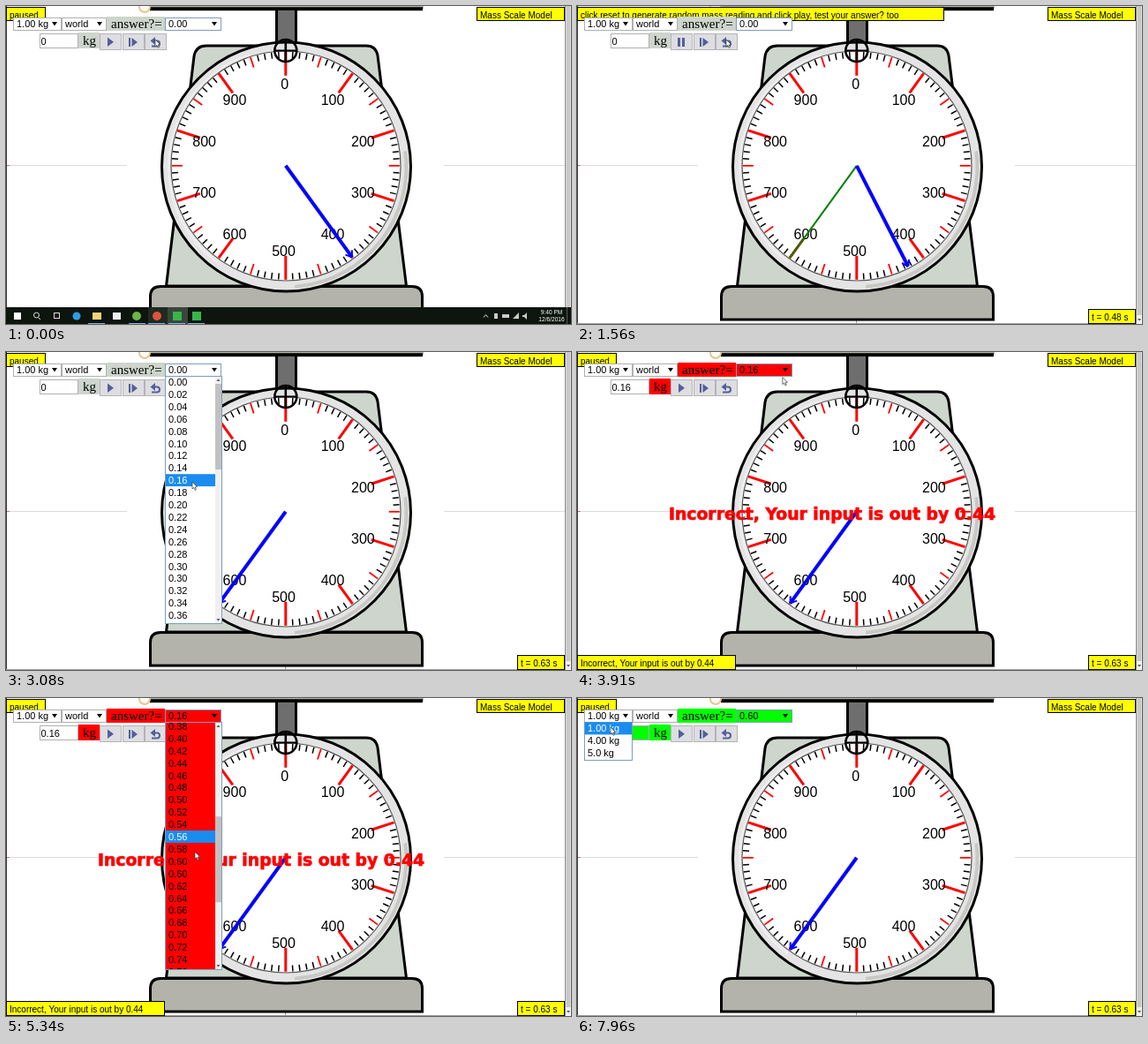
An HTML page with a canvas that plays this animation: 640 by 360 pixels, repeating every 7990 ms.

```html
<!DOCTYPE html>
<html lang="en">
<head>
<meta charset="utf-8">
<title>Mass Scale Model</title>
<style>
html, body { margin: 0; width: 100%; height: 100%; overflow: hidden; background: #fff; }
canvas { display: block; width: 640px; height: 360px; }
</style>
</head>
<body>
<canvas id="stage"></canvas>
<script>
const LOOP = 7990;
const RESET = 260, RUN = 340, STOP = 1950;
const ROW = 13.9, LIST_TOP = 27;
const CX = 316.8, CY = 180.8;
const SANS = '"Liberation Sans", Arial, sans-serif';
const SERIF = '"Liberation Serif", "Times New Roman", serif';
const GREY = '#cdd5cd', RED = '#ff0000', GREEN = '#00ff00', BLUE = '#0000ff';

const canvas = document.getElementById('stage');
const dpr = window.devicePixelRatio || 1;
canvas.width = 640 * dpr;
canvas.height = 360 * dpr;
const g = canvas.getContext('2d');

// pointer path: time, x, y
const path = [
  [0, 169, 38], [1950, 169, 38], [2480, 236, 17], [2600, 236, 17],
  [2900, 213, 118], [3000, 211, 147], [3310, 211, 147], [3970, 235, 17],
  [4420, 235, 17], [4660, 223, 93], [4760, 223, 93], [5190, 220, 143],
  [5220, 220, 143], [5340, 214, 174], [5650, 210, 213], [5950, 207, 197],
  [6550, 207, 197], [7070, 120, 49], [7340, 52, 19], [7400, 50, 20],
  [7530, 42, 32], [7690, 42, 33], [7960, 38, 33], [LOOP, 38, 33]
];

const clamp = v => Math.max(0, Math.min(1, v));
const ease = v => v * v * (3 - 2 * v);
const between = (t, a, b) => t >= a && t < b;

function pointer(t) {
  let i = 1;
  while (i < path.length - 1 && path[i][0] < t) i++;
  const a = path[i - 1], b = path[i];
  const k = clamp((t - a[0]) / (b[0] - a[0]));
  return [a[1] + (b[1] - a[1]) * k, a[2] + (b[2] - a[2]) * k];
}

function rect(x, y, w, h, fill, edge) {
  g.fillStyle = fill;
  g.fillRect(x, y, w, h);
  if (edge) {
    g.strokeStyle = edge;
    g.lineWidth = 1;
    g.strokeRect(x + 0.5, y + 0.5, w - 1, h - 1);
  }
}

function text(s, x, y, font, color = '#000', align = 'left') {
  g.font = font;
  g.fillStyle = color;
  g.textAlign = align;
  g.fillText(s, x, y);
}

function line(x1, y1, x2, y2, color, width) {
  g.strokeStyle = color;
  g.lineWidth = width;
  g.beginPath();
  g.moveTo(x1, y1);
  g.lineTo(x2, y2);
  g.stroke();
}

function disc(x, y, r, fill, edge, width) {
  g.beginPath();
  g.arc(x, y, r, 0, 7);
  if (fill) { g.fillStyle = fill; g.fill(); }
  if (edge) { g.strokeStyle = edge; g.lineWidth = width; g.stroke(); }
}

function arc(r, from, to, color, width) {
  g.beginPath();
  g.arc(317.5, 182, r, from, to);
  g.strokeStyle = color;
  g.lineWidth = width;
  g.stroke();
}

function poly(points, fill) {
  g.beginPath();
  points.forEach(([x, y]) => g.lineTo(x, y));
  g.closePath();
  g.fillStyle = fill;
  g.fill();
}

function outline(fill) {
  g.fillStyle = fill;
  g.fill();
  g.strokeStyle = '#000';
  g.lineWidth = 3;
  g.stroke();
}

const polar = (value, r, x = CX, y = CY) => {
  const a = value / 1000 * 2 * Math.PI;
  return [x + r * Math.sin(a), y - r * Math.cos(a)];
};

function drawScale() {
  line(0, 180.5, 137, 180.5, '#dcdcdc', 1);
  line(496, 180.5, 633, 180.5, '#dcdcdc', 1);
  line(0, 180.5, 4, 180.5, '#b08080', 1);
  line(316.5, 356, 316.5, 360, '#999', 1);

  // housing
  g.beginPath();
  g.moveTo(181.5, 317);
  g.lineTo(213, 57);
  g.quadraticCurveTo(215, 45, 227, 45);
  g.lineTo(408, 45);
  g.quadraticCurveTo(419, 45, 421, 56);
  g.lineTo(453.5, 317);
  g.closePath();
  outline(GREY);

  // top plate and column
  rect(163, 0, 310, 3, '#b3b3ab');
  line(163, 3.3, 472, 3.3, '#000', 4);
  rect(306, 5, 23, 43, '#6e6e6e');
  line(306.5, 4, 306.5, 48, '#000', 3);
  line(328.5, 4, 328.5, 48, '#000', 3);

  // base
  g.beginPath();
  g.moveTo(163.5, 355);
  g.lineTo(163.5, 329);
  g.quadraticCurveTo(163.5, 317.5, 175, 317.5);
  g.lineTo(460, 317.5);
  g.quadraticCurveTo(471.5, 317.5, 471.5, 329);
  g.lineTo(471.5, 355);
  g.closePath();
  outline('#b3b3ab');

  // rim and face
  disc(317.5, 182, 141, '#e4e4e4', '#000', 3);
  arc(136, -0.13, 1.5, '#c8c8c4', 4);
  arc(133, 2.2, 4.4, '#eee', 3);
  disc(317, 181, 130, '#fff', '#555', 1.2);

  for (let v = 0; v < 1000; v += 10) {
    const major = v % 100 === 0, half = v % 50 === 0;
    const inner = major ? 102 : half ? 117 : 122;
    line(...polar(v, inner), ...polar(v, 129),
      half ? RED : '#000', major ? 3 : half ? 1.8 : 1.5);
  }
  for (let v = 0; v < 1000; v += 100) {
    const [x, y] = polar(v, 94.5, 314.5, 182.5);
    text(v, v ? x : x + 1.3, y + 5.5, '16px ' + SANS, '#000', 'center');
  }

  disc(316.8, 50.5, 12.5, null, '#000', 2.6);
  line(304, 50.5, 330, 50.5, '#000', 2);
  line(316.8, 38, 316.8, 63, '#000', 2.6);
}

function drawNeedle(value) {
  const [x, y] = polar(value, 128);
  line(CX, CY, x, y, BLUE, 4);
  const a = Math.atan2(y - CY, x - CX);
  for (const side of [-0.6, 0.6]) {
    line(x, y, x - 8 * Math.cos(a + side), y - 8 * Math.sin(a + side), BLUE, 2);
  }
}

function banner(s, color) {
  text(s, 289, 190, 'bold 18.8px "DejaVu Sans", Verdana, sans-serif', color, 'center');
  g.strokeStyle = color;
  g.lineWidth = 0.7;
  g.strokeText(s, 289, 190);
}

function label(s, x, y, w, h = 17) {
  rect(x, y, w, h, '#ffff00', '#000');
  text(s, x + 4, y + 12.5, '10px ' + SANS);
}

function select(s, x, w, fill, edge = '#b0b0b0') {
  rect(x, 13, w, 15, fill, edge);
  text(s, x + 4, 24, '11px ' + SANS);
  const ax = x + w - 8;
  poly([[ax - 3, 18], [ax + 3, 18], [ax, 22.5]], '#000');
}

function drawButtons(playing) {
  const ink = '#545f98';
  for (const x of [106, 132, 157]) rect(x, 31, 25, 19, '#dedee2', '#b4b4b8');
  if (playing) {
    rect(114, 36, 3, 10, ink);
    rect(119, 36, 3, 10, ink);
  } else {
    poly([[115, 35.5], [122, 40.8], [115, 46]], ink);
  }
  rect(139, 36, 2, 10, ink);
  poly([[142.5, 36], [149, 41], [142.5, 46]], ink);
  poly([[163.5, 39.5], [169, 35], [169, 44]], ink);
  g.beginPath();
  g.moveTo(168, 39.5);
  g.lineTo(171, 39.5);
  g.arc(171, 42.5, 3, -Math.PI / 2, Math.PI / 2);
  g.lineTo(165, 45.5);
  g.strokeStyle = ink;
  g.lineWidth = 2;
  g.stroke();
}

// 0.30 and 0.60 are listed twice
const option = i => ((i - (i > 15) - (i > 31)) * 0.02).toFixed(2);

function drawAnswers(t, fill, scroll, chosen) {
  const y = pointer(t - 70)[1];
  const hot = y > LIST_TOP ? Math.floor(scroll + (y - LIST_TOP) / ROW) : chosen;
  rect(180, 27, 65, 281, fill, '#7f9db9');
  g.save();
  g.beginPath();
  g.rect(181, 28, 63, 279);
  g.clip();
  for (let i = Math.floor(scroll); i < scroll + 21; i++) {
    const top = LIST_TOP + (i - scroll) * ROW;
    if (i === hot) rect(181, top, 56, ROW, '#1a8cf0');
    text(option(i), 184, top + 11, '11px ' + SANS, i === hot ? '#fff' : '#000');
  }
  rect(237, 28, 7, 279, '#f0f0f0');
  rect(237, 36 + scroll * 4.87, 7, 97, '#c1c1c1');
  poly([[238.5, 33], [242.5, 33], [240.5, 30.5]], '#555');
  poly([[238.5, 302], [242.5, 302], [240.5, 304.5]], '#555');
  g.restore();
}

function drawMasses(t) {
  const y = pointer(t)[1];
  const hot = Math.max(0, Math.floor((y - LIST_TOP) / ROW));
  rect(8, 27, 55, 44, '#fff', '#7f9db9');
  ['1.00 kg', '4.00 kg', '5.0 kg'].forEach((s, i) => {
    const top = LIST_TOP + i * ROW;
    if (i === hot) rect(9, top + 0.5, 53, ROW, '#1a8cf0');
    text(s, 12, top + 11, '11px ' + SANS, i === hot ? '#fff' : '#000');
  });
}

function drawTaskbar(drop) {
  g.save();
  g.translate(0, drop);
  rect(0, 341, 640, 19, '#0e150f');
  rect(161, 341, 22, 19, '#1f2a20');
  rect(183, 341, 23, 19, '#3b453c');
  rect(9, 347, 8, 8, '#fff');
  disc(34.5, 350, 3, null, '#ddd', 1);
  line(36.5, 352.5, 39, 355, '#ddd', 1);
  rect(54, 347, 7, 7, '#0e150f', '#ddd');
  disc(80, 351, 4.5, '#2f9be0');
  rect(98, 347, 10, 8, '#f3d375');
  rect(121, 347, 9, 8, '#eee');
  disc(148, 351, 5, '#69b545');
  disc(171, 351, 5, '#e0523f');
  rect(189, 346, 10, 10, '#38b54a');
  rect(211, 346, 10, 10, '#38b54a');
  for (const x of [93, 139, 161, 184, 206]) rect(x, 359, 19, 1, '#7db7e0');
  g.beginPath();
  g.moveTo(541, 352.5);
  g.lineTo(543.5, 349.5);
  g.lineTo(546, 352.5);
  g.strokeStyle = '#ddd';
  g.lineWidth = 1;
  g.stroke();
  rect(553, 348, 4, 6, '#ccc');
  rect(562, 349, 8, 4, '#ccc');
  poly([[574, 354], [581, 354], [581, 347]], '#ccc');
  poly([[585, 350], [587, 350], [590, 347], [590, 355], [587, 352], [585, 352]], '#ccc');
  text('9:40 PM', 618, 348.5, '6.6px ' + SANS, '#fff', 'center');
  text('12/6/2016', 618, 357, '6.6px ' + SANS, '#fff', 'center');
  rect(635, 341, 1, 19, '#555');
  g.restore();
}

function drawPointer(x, y) {
  const shape = [[0, 0], [0, 8], [1.8, 6.4], [3.2, 9.4], [4.4, 8.8], [3.2, 5.9], [5.6, 5.7]];
  poly(shape.map(([a, b]) => [x + a, y + b]), '#fff');
  g.strokeStyle = '#333';
  g.lineWidth = 0.7;
  g.stroke();
}

function draw(t) {
  const playing = between(t, RESET, STOP);
  const shown = t < 500 ? RUN : Math.min(t, STOP);
  const time = t >= STOP ? 0.63 : Math.floor((shown - RUN) / 25.4) / 100;
  const mass = t < RESET ? 400 : Math.min(600, 600 * Math.pow(time / 0.63, 1.27));
  const wrong = between(t, 3310, 6250), right = t >= 6250;
  const tint = wrong ? RED : right ? GREEN : GREY;
  const fill = wrong ? RED : right ? GREEN : '#fff';
  const answer = wrong ? '0.16' : right ? '0.60' : '0.00';
  const note = wrong ? 'Incorrect, Your input is out by 0.44'
    : right && t < 7690 ? 'Great! You have the right answer!' : '';

  g.setTransform(dpr, 0, 0, dpr, 0, 0);
  rect(0, 0, 640, 360, '#fff');
  drawScale();
  disc(157, 1, 6, '#fffdf5', '#e6c58f', 2);
  if (playing) line(CX, CY, ...polar(600, 129), '#008000', 2);
  drawNeedle(mass);
  if (note) banner(note, tint);

  line(0.5, 0, 0.5, 360, '#333', 1);
  line(633.5, 0, 633.5, 360, '#888', 1);
  line(0, 359.5, 634, 359.5, '#999', 1);

  // page scrollbar
  rect(634, 0, 6, 360, '#f1f1f1');
  rect(634.5, 0, 5, 350, '#c8c8c8');
  poly([[635, 354], [639, 354], [637, 356.5]], '#555');

  label(playing ? 'click reset to generate random mass reading and click play, test your answer? too' : 'paused',
    0, 1, between(t, RESET, 2130) ? 416 : 45, 16);
  label('Mass Scale Model', 533, 1, 100, 16);
  label('t = ' + time.toFixed(2) + ' s', 579, 343, 54);
  if (note) label(note, 0, 343, wrong ? 180 : 177);

  select('1.00 kg', 8, 55, '#fff');
  select('world', 63, 51, '#fff');
  rect(114, 12, 66, 16, tint);
  text('answer?=', 119, 24.5, '15px ' + SERIF);
  select(answer, 180, 64, fill, '#7f9db9');
  rect(38, 31, 44, 17, t >= 7690 ? GREEN : '#fff', '#b0b0b0');
  if (t < 7690) text(wrong || right ? answer : '0', 39.5, 43.5, '11px ' + SANS);
  rect(82, 30, 24, 18, tint);
  text('kg', 87, 43.5, '15px ' + SERIF);
  drawButtons(playing);

  if (between(t, 2560, 3310)) drawAnswers(t, fill, 0, 0);
  if (between(t, 4400, 6250)) {
    drawAnswers(t, fill, 20.15 * ease(clamp((t - 4850) / 340)), 8);
  }
  if (t >= 7370) drawMasses(t);
  if (t < RUN) drawTaskbar(Math.max(0, Math.floor((t - 180) / 40)) * 5);
  drawPointer(...pointer(t));
}

function loop() {
  draw(performance.now() % LOOP);
  requestAnimationFrame(loop);
}
loop();
</script>
</body>
</html>
```
